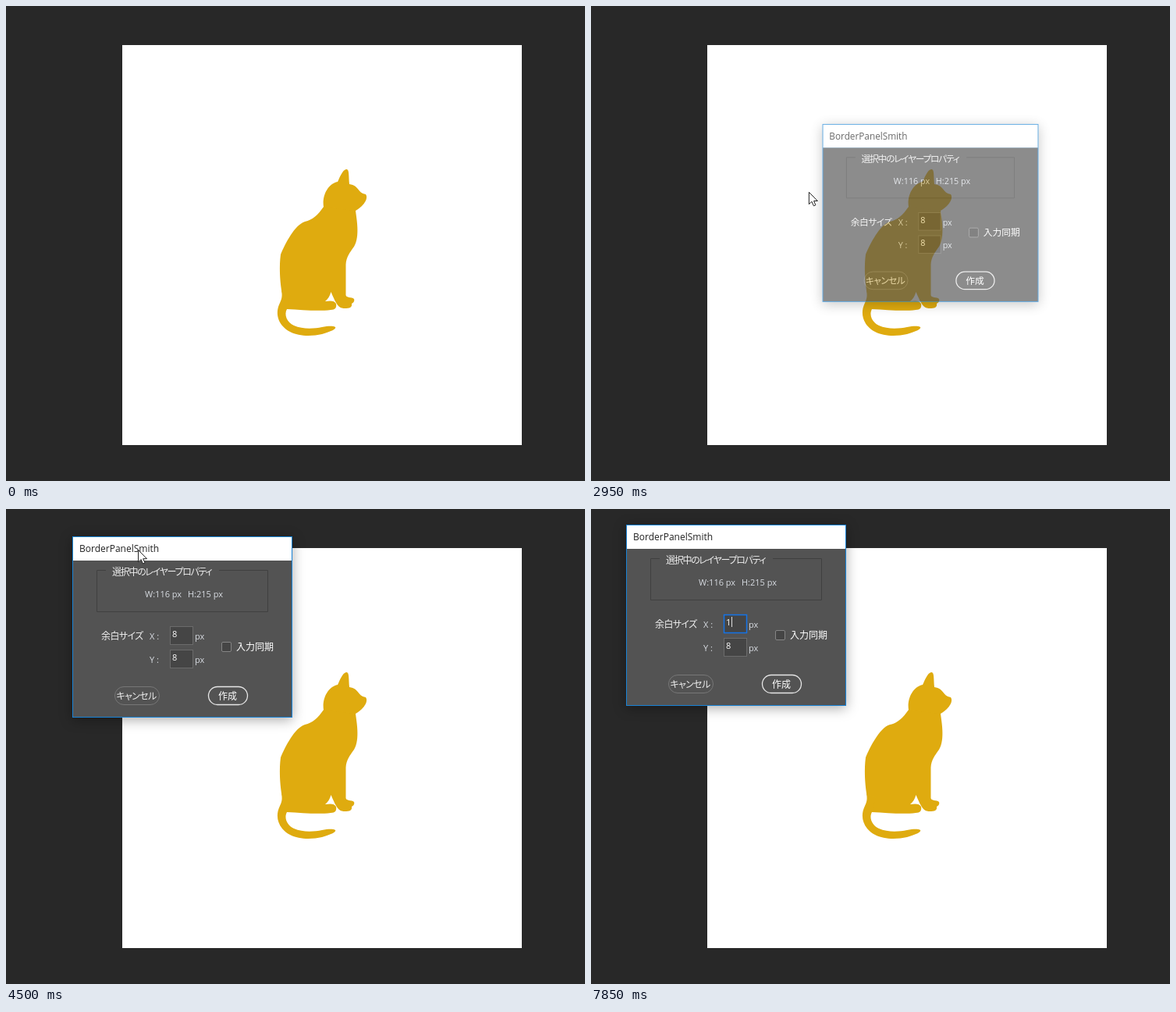
An HTML page for the animation above (8 s loop, 742x608 px).

```html
<!DOCTYPE html>
<html lang="ja">
<head>
<meta charset="utf-8">
<style>
html, body { margin: 0; width: 100%; height: 100%; overflow: hidden; background: #282828; }
svg { display: block; }
text { font: 11px "Open Sans", "Noto Sans", sans-serif; fill: #d8dce2; white-space: pre; }
.title { font-size: 12px; fill: #222; }
.value { fill: #fff; }
.jp { font: 12px "Noto Sans CJK JP", "Noto Sans CJK", sans-serif; font-feature-settings: "palt"; letter-spacing: -.6px; fill: #eee; }
.legend { letter-spacing: -1.3px; }
.kanji { letter-spacing: 0; fill: #fff; }
.mid { text-anchor: middle; }
.box { fill: #454545; stroke: #6b6b6b; }
.focus { stroke: #1473e6; stroke-width: 1.5; }
.white { fill: #fff; stroke: #222; }
.black { fill: #000; stroke: #ccc; }
#dialog { filter: drop-shadow(0 3px 8px #0005); }
</style>
</head>
<body>
<svg width="742" height="608" viewBox="0 0 742 608">
  <rect width="742" height="608" fill="#282828"/>
  <rect x="149" y="50" width="512" height="512" fill="#fff"/>

  <g fill="#dfab0f">
    <!-- head, body, tail -->
    <path d="M407 257C405 245 411 228 425 225C428 219 431 210 436 209C440 208 439 217 440 228C453 230 450 239 461 241C465 247 458 256 448 262L440 270H415Z"/>
    <path d="M407 257L448 262C449 271 454 295 446 308C441 315 436 321 435.500 331V370C436 374 443 372 446 375C447 378 445 380 443 381C444 386 440 387 434 387C427 387 424 384 416.500 366C415 371 413 375 409 378C416 377 421 377 423 381C424 386 422 389 416 389C400 391 380 389 360 388L353 364C351 350 350 333 352 318C358 304 370 280 383 276C393 274 400 267 407 257Z"/>
    <path d="M360 388C356 395 360 405 369 409C380 414 395 413 405 411C412 410 418 409 422 411C424 413 416 417 405 420C392 423 375 423 364 417C349 409 344 394 351 380C354 374 354 370 353 364L365 370Z"/>
  </g>

  <g id="dialog">
    <rect width="282" height="232" fill="#1883d7"/>
    <rect x="1" y="1" width="280" height="30" fill="#fff"/>
    <rect x="1" y="31" width="280" height="200" fill="#535353"/>
    <text class="title" x="9" y="20">BorderPanelSmith</text>

    <path d="M43 43.500H31.500V96.500H250.500V43.500H188" fill="none" stroke="#404040"/>
    <text class="jp legend" x="51" y="49.500">選択中のレイヤープロパティ</text>
    <text x="93" y="78">W:116 px</text>
    <text x="148" y="78">H:215 px</text>

    <text class="jp" x="37" y="132">余白サイズ</text>
    <text x="99" y="132">X :</text>
    <text x="99" y="162">Y :</text>
    <rect class="box" id="field" x="125.500" y="115.500" width="29" height="23"/>
    <rect class="box" x="125.500" y="145.500" width="29" height="23"/>
    <text class="value" id="value" x="128" y="129"></text>
    <text class="value" x="128" y="159">8</text>
    <path id="caret" stroke="#ddd"/>
    <text x="157" y="132">px</text>
    <text x="157" y="162">px</text>

    <rect x="191.500" y="135.500" width="12" height="12" rx="1.500" fill="#454545" stroke="#858585"/>
    <text class="jp kanji" x="210" y="146">入力同期</text>

    <rect x="54.500" y="192.500" width="57" height="23" rx="11.500" fill="none" stroke="#777"/>
    <text class="jp mid" x="82" y="208.500">キャンセル</text>
    <rect x="174.500" y="192.500" width="50" height="23" rx="11.500" fill="none" stroke="#e6e6e6" stroke-width="1.300"/>
    <text class="jp kanji mid" x="199" y="208.500">作成</text>
  </g>

  <circle id="ring" cx="192" cy="151" r="14" fill="none" stroke="#999"/>

  <g id="cursor">
    <g id="move">
      <path d="M0 0V15.500L4 11.500H11Z" fill="#000" stroke="#ddd"/>
      <g transform="translate(14.500 16.500)">
        <path d="M0-6L6 0L0 6L-6 0Z" fill="#000" stroke="#ccc"/>
        <path d="M-4 0H4M0-4V4" stroke="#ddd"/>
      </g>
    </g>
    <path id="arrow" d="M.5.5V16L4 12.500L6.500 18L9 17L6.700 11.700H11.500Z"/>
    <path id="beam" d="M-3-8.500H3M0-8.500V8.500M-3 8.500H3" fill="none" stroke="#eee"/>
  </g>
</svg>
<script>
const LOOP = 8000, TICK = 77, BLINK = 530;
const GRAB = 4100, DROP = 4820, PRESS = 5743, FOCUS = 5820, RELEASE = 5890;
const $ = id => document.getElementById(id);
const clamp = (v, lo, hi) => Math.min(hi, Math.max(lo, v));
const within = (t, from, to) => t >= from && t < to;
const show = (id, on) => $(id).style.display = on ? '' : 'none';

// Share of a stepped move that is done; the first step falls on its start
const progress = (t, start, steps) => clamp((Math.floor((t - start) / TICK) + 1) / steps, 0, 1);
const ease = k => k * k * (3 - 2 * k);

// Pointer strokes in order; each curves from the last end, via an optional bend
const home = [380, 612];
const strokes = [
  { start: 680, steps: 7, bend: [480, 530], to: [660, 612] },
  { start: 1780, steps: 1, to: [716, 492] },
  { start: 1857, steps: 10, to: [338, 237] },
  { start: 2620, steps: 11, bend: [270, 290], to: [200, 102] },
  { start: 3480, steps: 8, bend: [260, 250], to: [378, 166] },
  { start: 4190, steps: 5, bend: [191, 147], to: [169, 52] },
  { start: 4575, steps: 4, to: [129, 37] },
  { start: 4883, steps: 2, to: [147, 86] },
  { start: 5050, steps: 10, bend: [210, 230], to: [192, 151] },
  { start: RELEASE, steps: 1, to: [231, 241] },
  { start: 5967, steps: 4, bend: [275, 400], to: [248, 549] }
];
const edits = [
  { at: 0, text: '8' }, { at: FOCUS, text: '8' }, { at: 7130, text: '' }, { at: 7850, text: '1' }
];

function pointer(t) {
  let p = home;
  for (const { start, steps, bend, to } of strokes) {
    if (t < start) break;
    const u = ease(progress(t, start, steps)), v = 1 - u;
    p = p.map((a, i) => {
      const mid = bend ? bend[i] : (a + to[i]) / 2;
      return v * v * a + 2 * u * v * mid + u * u * to[i];
    });
  }
  return p;
}

function draw(t) {
  const [px, py] = pointer(t);
  $('cursor').setAttribute('transform', `translate(${px} ${py})`);
  const beam = within(t, PRESS - TICK, RELEASE);
  show('cursor', t < edits.at(-1).at);
  show('move', t < 2620);
  show('arrow', t >= 2620 && !beam);
  show('beam', beam);
  $('arrow').setAttribute('class', t < RELEASE ? 'white' : 'black');

  // The dialog hangs on the pointer while it is dragged
  const [gx, gy] = pointer(clamp(t, GRAB, DROP));
  const alpha = progress(t, 2851, 3);
  $('dialog').setAttribute('transform',
    `translate(${gx + 57} ${gy + 99}) scale(${.946 + .054 * alpha}) translate(-141 -116)`);
  $('dialog').style.opacity = alpha;

  const edit = edits.findLast(e => t >= e.at);
  const lit = Math.floor((t - edit.at) / BLINK) % 2 === 0;
  $('value').textContent = edit.text;
  $('caret').setAttribute('d', `M${129.5 + 6 * edit.text.length} 118V131`);
  show('caret', t >= FOCUS && lit);
  $('field').setAttribute('class', t >= FOCUS ? 'box focus' : 'box');

  show('ring', within(t, PRESS, RELEASE + TICK));
  $('ring').style.opacity = t < RELEASE ? .9 : .45;
}

const begin = performance.now();
function tick() {
  draw((performance.now() - begin) % LOOP);
  requestAnimationFrame(tick);
}
tick();
</script>
</body>
</html>
```
